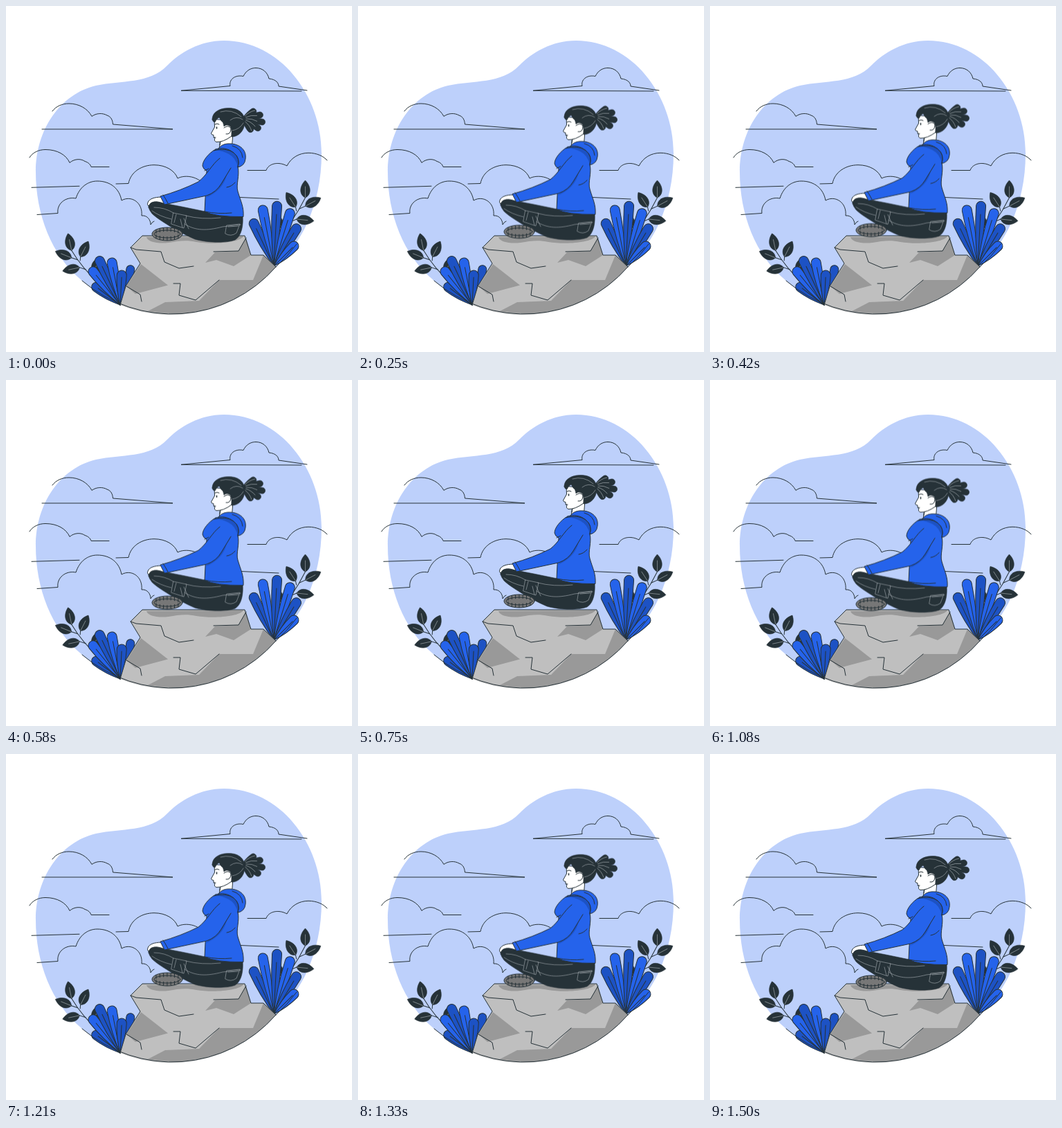
Recreate the animation shown at these times as an HTML page. Size 500 by 500 pixels, loop 1540 ms.

```html
<!DOCTYPE html>
<html lang="en">
<head>
<meta charset="utf-8">
<title>Meditation</title>
<style>
html, body { margin: 0; width: 100%; height: 100%; overflow: hidden; background: #fff; }
svg { display: block; width: 100vw; height: 100vh; }
path, ellipse { stroke-linejoin: round; stroke-linecap: round; }
.line { fill: none; stroke: #263238; stroke-width: 1; }
.ink { fill: #263238; stroke: #263238; stroke-width: .6; }
.skin { fill: #fff; stroke: #263238; stroke-width: 1; }
.blue { fill: #2563eb; stroke: #263238; stroke-width: 1; }
.dark { fill: #1d52c4; stroke: #263238; stroke-width: 1; }
.deep { fill: #1d52c4; }
.shade { fill: #999; }
.seam { fill: none; stroke: #a9b1b5; stroke-width: .6; }
</style>
</head>
<body>
<svg viewBox="0 0 500 500">
  <path fill="#bdd0fb" d="M233 86C252 67 280 50 315 50C395 50 456 128 456 213C456 290 425 345 390 377A199.400 199.400 0 0 1 110 397C65 360 43 300 43 240C43 178 79 127 130 115C167 107 207 113 233 86Z"/>

  <g class="line">
    <path d="M427 123L253 122.300L324 115.500C322 107 330 99 343 101.500C347 93 354 89.500 361 89.500C371 89.500 378 96 380 105C390 106 394 111 394 116L435 122"/>
    <path d="M67 152C72 145 81 141 91 141C105 141 118 148 124 159.500C130 155 139 154 146 158C152 160 154 165 154.500 171L241 178H52"/>
    <path d="M34 219C38 212 47 207.500 57 207.500C74 207.500 87 215 92 226.500C98 221 108 220 114 224.500C119 226 122 229 123 232.500H149"/>
    <path d="M37 262.300L106 260.300M338 276.500L394 279"/>
    <path d="M45 301.500L75 299.500C73 286 86 275 101 278C106 262 118 253 132 253C151 253 164 264 167 281C181 273 198 284 196 303C204 302 209 309 209 316Q211 312 214 311"/>
    <path d="M159 257L177 256.500C180 240 196 229.700 214 229.700C231 229.700 244 238 248 249C260 243 278 247 286 258"/>
    <path d="M349 237.500H376C379 228 393 224 406 231C412 219 424 212.300 437 212.300C449 212.300 459 217 464 223"/>
  </g>

  <g id="plants"></g>

  <path fill="#bfbfbf" d="M180 349L197 332H345L354 360H372L390 377A199.400 199.400 0 0 1 165 432L173 405L194 372Z"/>
  <g class="shade">
    <path d="M195 373L234 403.500L187 416L174 405Z"/>
    <path d="M288 371L302 356L336 354L347 335L354 360L329 376L304 367Z"/>
    <path d="M205 441L230 428L279 426L308 396H357L372 360L390 377A199.400 199.400 0 0 1 205 441Z"/>
    <path d="M203 334C205 341 220 344 235 342C250 339 262 338 275 341C300 345 337 342 343 333Z"/>
  </g>
  <g class="line">
    <path d="M165 432L173 405L194 372L180 349L197 332H345L354 360H372L390 377"/>
    <path d="M180 349L188 352L224 355L229 370L250 379L271 376"/>
    <path d="M242 401H252L250 418L274 425L308 396M300 355L336 354L347 335M174 405L194 417L196 427"/>
    <path d="M110 397A199.400 199.400 0 0 0 390 377Q407 362 420 344"/>
  </g>

  <g id="woman">
    <path class="ink" d="M206 291C205 283 213 281 223 284Q255 290 288 297L342 303C343 316 341 332 331 338C318 343 290 342 273 337C250 327 220 309 211 300Q207 295 206 291Z"/>
    <g class="seam">
      <path d="M214 291Q229 291 242 299M211 296Q222 304 239 308M260 303Q282 309 310 306M258 315C274 325 290 325 313 319L339 316"/>
      <path d="M242 299L261 303L257 321L239 315ZM246 301L243 313M252 308L255 320M257 307L264 322"/>
      <path d="M319 317L338 315L333 328Q325 334 317 329ZM321 319L336 318"/>
    </g>
    <g id="shoe">
      <ellipse cx="233" cy="329.500" rx="22" ry="9.500" fill="#777" stroke="#263238"/>
      <ellipse class="line" cx="233" cy="329.500" rx="19" ry="5.500"/>
    </g>

    <path class="skin" d="M227 276C218 276 210 277 206 282Q203 287 206 289Q209 283 214 283Q222 282 231 287Z"/>
    <path class="skin" d="M310 189L308 209H326L328 184Z"/>

    <path class="blue" d="M303 207C292 213 284 224 284 231Q285 236 290 238L287 297Q302 305 343 304.500C344 290 339 282 335 268C332 258 338 245 335 232L338 214Q320 200 303 207Z"/>
    <path class="deep" d="M289 277L312 254L319 244Q314 266 289 277Z"/>
    <path class="blue" d="M309 220C298 228 290 245 278 254Q252 267 223 275L229 287L290 274Q304 269 311 257L325 234"/>
    <path class="line" d="M227 273Q231 279 234 285M287 238L293 235M319 262Q326 261 331 255M287 297Q307 301 326 299"/>
    <path class="blue" d="M307 206C311 200 318 198.500 325 199C339 200 348 209 346 221Q345 231 335 233Q339 220 329 212Q319 204 307 206Z"/>
    <path class="deep" d="M300 209Q318 204 329 212Q339 220 335 233Q332 219 322 214Q311 208 300 209Z"/>
    <path class="line" d="M300 209Q318 204 329 212Q339 220 335 233M327 202Q341 206 342 219"/>

    <g id="tail"></g>
    <path class="skin" d="M301 164L301.500 175L296.500 184Q297 186.500 300 186.500L300 189L302 191Q300 195 304 196.500Q314 197 326 188L328 166Z"/>
    <path class="ink" d="M298 164C298 153 309 147.500 322 147.500C337 147.500 346 156 345 169C344 181 336 189 326 189Q327 180 324 174Q319 170 315 174Q314 167 311 166L308 161Q304 163 302 168Q299 168 298 164Z"/>
    <path class="skin" d="M315 176Q322 171 325 177Q325 186 318 185" stroke-width=".8"/>
    <path class="line" d="M302 171Q305 169 308 171M300 190H303M310 196L309 201"/>
    <ellipse cx="304.500" cy="176" rx=".9" ry="1.700" fill="#263238"/>
    <path class="seam" d="M310 153Q326 148 340 160M324 165Q333 158 342 164M327 180Q338 178 343 169"/>
  </g>
</svg>
<script>
const NS = 'http://www.w3.org/2000/svg';
const $ = id => document.getElementById(id);
const wave = u => Math.sin(Math.PI * u);

function add(parent, tag, attrs) {
  const el = document.createElementNS(NS, tag);
  for (const key in attrs) el.setAttribute(key, attrs[key]);
  return parent.appendChild(el);
}

const path = (parent, style, d) => add(parent, 'path', { class: style, d });

// Group whose x axis points along the angle.
const axis = (parent, x, y, angle) =>
  add(parent, 'g', { transform: `translate(${x} ${y}) rotate(${angle})` });

function frond(parent, x, y, angle, len, width, style) {
  const g = axis(parent, x, y, angle), r = width / 2, end = len - r;
  path(g, style, `M0 0C${len * .3} ${-r * .7} ${len * .6} ${-r} ${end} ${-r}` +
    `A${r} ${r} 0 0 1 ${end} ${r}C${len * .6} ${r} ${len * .3} ${r * .7} 0 0Z`);
  return g;
}

// Fronds spread between two angles, longest where the sine peaks.
function bush(x, y, count, from, to, short, long, phase) {
  for (let i = 0; i < count; i++) {
    const u = i / (count - 1);
    const len = short + (long - short) * wave(phase + (1 - phase) * u);
    const g = frond($('plants'), x, y, from + (to - from) * u, len, 14, i % 2 ? 'blue' : 'dark');
    path(g, 'line', `M0 0H${len * .8}`);
  }
}

function leaf(parent, x, y, angle) {
  const g = axis(parent, x, y, angle);
  path(g, 'ink', 'M0 0C4 -9 16 -9 25 0C16 9 4 9 0 0Z');
  path(g, 'seam', 'M1 0H16');
}

// Stem with a leaf at its tip and two pairs below; side picks the outer edge.
function sprig(x, y, angle, len, side) {
  const g = axis($('plants'), x, y, angle);
  path(g, 'line', `M0 0Q${len / 2} ${side * 5} ${len} 0`);
  leaf(g, len, 0, -side * -0 + (side < 0 ? 28 : -34));
  for (let i = 0; i < 2; i++) {
    const outer = len * (.87 - .3 * i), inner = len * (.75 - .47 * i);
    path(g, 'line', `M${outer - 8} ${side * 2}L${outer} ${side * 7}M${inner - 4} 0L${inner} ${-side * 4}`);
    leaf(g, outer, side * 7, side * (28 + 34 * i));
    leaf(g, inner, -side * 4, -side * 67);
  }
}

sprig(134, 400, -130, 61, -1);
sprig(390, 340, -56, 76, 1);
frond($('plants'), 172, 425, -80, 51, 12, 'dark');
bush(165, 432, 5, -143, -87, 50, 77, 0);
bush(387, 376, 6, -115, -45, 48, 94, .2);

for (let i = 0; i < 5; i++) {
  const g = frond($('tail'), 341, 163, -33 + 21 * i, 24 + 10 * wave(i / 4), 9, 'ink');
  path(g, 'seam', 'M6 -1Q14 -3 22 0');
}

for (let x = -16; x <= 16; x += 5.3) {
  const h = 9 * Math.sqrt(1 - (x / 22) ** 2);
  path($('shoe'), 'line', `M${233 + x} ${329.5 - h}v5M${233 + x} ${329.5 + h}v-5`);
}

// Float up 10px and back at 24 steps a second, then a short rest.
const loop = 1540, easing = 'steps(18, end)';
const at = (y, time, ease = 'linear') =>
  ({ transform: `translateY(${y}px)`, offset: time / loop, easing: ease });
$('woman').animate(
  [at(0, 0, easing), at(-10, 750, easing), at(0, 1500), at(0, loop)],
  { duration: loop, iterations: Infinity, delay: -4 }
);
</script>
</body>
</html>
```
